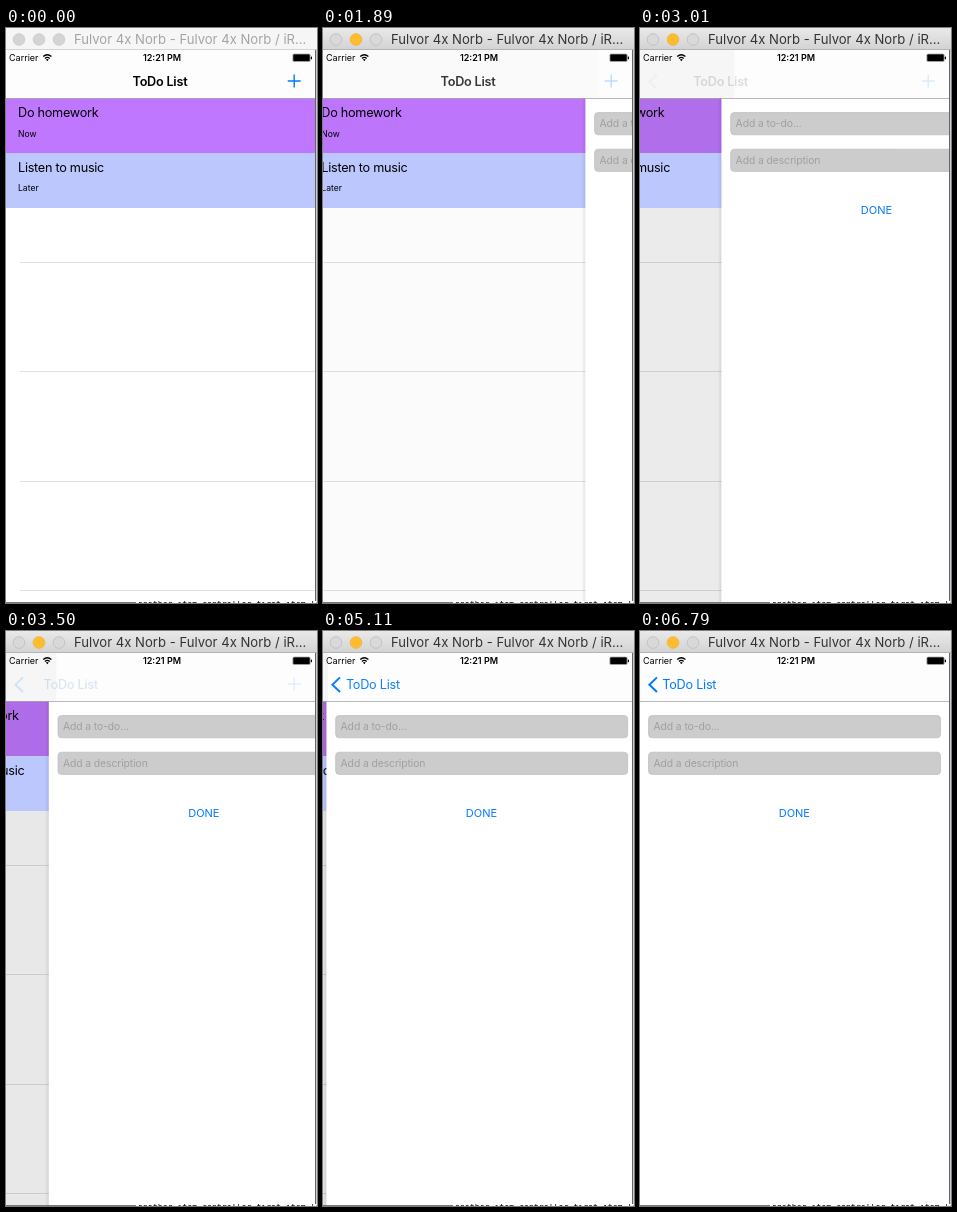
An HTML page for the animation above (8 s loop, 311 by 575 pixels).

```html
<!DOCTYPE html>
<html lang="en">
<head>
<meta charset="utf-8">
<title>To-do push transition</title>
<style>
  html, body { margin: 0; width: 100%; height: 100%; overflow: hidden; background: #fff; }
  svg { display: block; width: 311px; height: 575px; font-family: Inter, Roboto, "Liberation Sans", sans-serif; }
  text { white-space: pre; }
  .body { font-size: 12.7px; letter-spacing: -.022em; }
  .small { font-size: 8.6px; }
  .status { font-size: 9px; }
  .nav { font-size: 12.7px; letter-spacing: -.02em; }
  .hint { font-size: 10.4px; letter-spacing: -.01em; fill: #a0a0a0; }
  .done { font-size: 11px; fill: #007aff; }
  .rule { stroke: #e0e0e2; }
  .field { fill: #ccc; stroke: #bcbcbc; stroke-width: .7; }
  .code { font: 8.2px "DejaVu Sans Mono", monospace; }
</style>
</head>
<body>
<svg viewBox="0 0 311 575">
  <defs>
    <linearGradient id="activeBar" x2="0" y2="1">
      <stop stop-color="#e9e9e9"/><stop offset="1" stop-color="#d3d3d3"/>
    </linearGradient>
    <linearGradient id="shade">
      <stop stop-opacity="0"/><stop offset="1" stop-opacity=".09"/>
    </linearGradient>
    <clipPath id="screen"><rect y="22" width="309.5" height="552"/></clipPath>
    <clipPath id="below"><rect x="130" y="573" width="181" height="2"/></clipPath>
  </defs>

  <rect width="311" height="575" fill="#fff"/>

  <g clip-path="url(#screen)">
    <g id="list">
      <rect y="70.5" width="420" height="54.5" fill="#bf77ff"/>
      <g id="rules"></g>
      <rect id="dim" y="70" width="420" height="504"/>
      <rect y="125" width="309.5" height="55" fill="#bbc7fd"/>
      <text class="body" x="12" y="88.5">Do homework</text>
      <text class="small" x="12" y="108.6">Now</text>
      <text class="body" x="12" y="143.5">Listen to music</text>
      <text class="small" x="12" y="163.4">Later</text>
    </g>

    <g id="form">
      <rect x="-5" y="70" width="4" height="504" fill="url(#shade)"/>
      <rect x="-1" y="70" width="311" height="504" fill="#fff"/>
      <rect class="field" x="8.2" y="84.6" width="292" height="22.2" rx="3.5"/>
      <rect class="field" x="8.2" y="121.2" width="292" height="22.2" rx="3.5"/>
      <text class="hint" x="13.1" y="99.2">Add a to-do...</text>
      <text class="hint" x="13.1" y="135.8">Add a description</text>
      <text class="done" x="154" y="185.9" text-anchor="middle">DONE</text>
    </g>

    <rect y="22" width="310" height="48.5" fill="#fdfdfd"/>
    <rect id="navDim" y="22" height="48"/>
    <path d="M0 70.5H309.5" stroke="#000" stroke-opacity=".28"/>
    <path id="back" d="M17 46.4L9.4 53.7L17 61" fill="none" stroke="#007aff" stroke-width="2"/>
    <text id="title" class="nav" y="58.2" font-weight="600">ToDo List</text>
    <text id="label" class="nav" y="58.2" fill="#007aff">ToDo List</text>
    <path id="plus" d="M281.7 53H294.7M288.2 46.5V59.5" stroke="#007aff" stroke-width="1.4"/>

    <text class="status" x="3" y="33">Carrier</text>
    <path d="M37.2 28.6Q41.3 24.9 45.4 28.6M38.9 30.5Q41.3 28.3 43.7 30.5" fill="none" stroke="#000" stroke-width="1.3"/>
    <path d="M39.9 31.6Q41.3 30.5 42.7 31.6L41.3 33.2Z"/>
    <text class="status" x="156" y="33" text-anchor="middle" font-weight="600">12:21 PM</text>
    <rect x="286.6" y="25.8" width="17.8" height="8" rx="1.5" opacity=".5"/>
    <rect x="287.4" y="26.6" width="16.2" height="6.4" rx=".8"/>
    <rect x="304.8" y="28.6" width="1.2" height="2.6" rx=".5"/>
  </g>

  <rect id="bar" width="311" height="21.5"/>
  <path id="barLine" d="M0 21.5H311"/>
  <g id="lights"></g>
  <text id="caption" x="68" y="16" font-size="13.1">Fulvor 4x Norb - Fulvor 4x Norb / iR...</text>

  <rect x="310" y="22" width="1" height="553" fill="#c8ccd8"/>
  <path d="M309.5 22V574" stroke="#666"/>
  <path d="M0 574.5H310" stroke="#777"/>
  <g clip-path="url(#below)">
    <rect x="130" y="573" width="181" height="2" fill="#fff"/>
    <text class="code" x="132" y="579">another item controller first item list</text>
  </g>
</svg>
<script>
  const LOOP = 8000, PRESS = 1400, MOVE = 1540, STEP = 70, LAST = 6790;
  const WIDTH = 309, SPRING = 0.00172, RELEASE = 1497;
  const NS = "http://www.w3.org/2000/svg";
  const $ = id => document.getElementById(id);
  const set = (el, attrs) => {
    for (const key in attrs) el.setAttribute(key, attrs[key]);
    return el;
  };
  const add = (parent, tag, attrs) =>
    parent.appendChild(set(document.createElementNS(NS, tag), attrs));

  for (const y of [234.5, 343.5, 453.5, 562.5])
    add($("rules"), "path", { class: "rule", d: `M14 ${y}H420` });
  const lights = [13, 33, 53].map(cx =>
    add($("lights"), "circle", { cx, cy: 11.5, r: 5.8, "stroke-width": 0.8 }));

  // Share of the push still to go: a critically damped spring, sampled in steps.
  function remaining(t) {
    if (t < MOVE) return 1;
    const at = MOVE + Math.floor((Math.min(t, LAST) - MOVE) / STEP) * STEP;
    const s = SPRING * (at - RELEASE);
    return (1 + s) * Math.exp(-s);
  }

  function drawWindow(active) {
    set($("bar"), { fill: active ? "url(#activeBar)" : "#f6f6f6" });
    set($("barLine"), { stroke: active ? "#b4b4b4" : "#d4d4d4" });
    set($("caption"), { fill: active ? "#333" : "#a4a4a4" });
    lights.forEach((light, i) => {
      const lit = active && i === 1;
      set(light, {
        fill: lit ? "#ffbd2e" : active ? "#d9d9d9" : "#d4d4d4",
        stroke: lit ? "#efb035" : active ? "#bcbcbc" : "#c8c8c8"
      });
    });
  }

  function draw(t) {
    const pressed = t >= PRESS;
    const q = remaining(t), p = 1 - q;
    const edge = q * WIDTH;
    drawWindow(pressed);

    set($("list"), { transform: `translate(${-0.3 * WIDTH * p} 0)` });
    set($("dim"), { opacity: 0.105 * p });
    set($("form"), { transform: `translate(${edge} 0)`, visibility: q < 1 ? "visible" : "hidden" });
    set($("navDim"), { width: Math.min(WIDTH, edge + 12 * Math.min(1, edge / 80)), opacity: 0.03 * Math.sqrt(p) });

    // The title lags the page a little, then settles as the back label.
    const lag = q + 0.58 * q * q * p - 0.8 * q * p ** 20;
    const x = 22.3 + 104.2 * lag;
    const blue = Math.min(1, 1.2 * p ** 16);
    set($("title"), { x, opacity: q ** 1.6 });
    set($("label"), { x, opacity: blue });
    set($("back"), { opacity: Math.min(1, 0.06 * p + 0.95 * blue) });
    set($("plus"), { opacity: pressed ? (0.08 + 0.2 * q) * Math.min(1, Math.max(0, (q - 0.02) / 0.04)) : 1 });
  }

  const start = performance.now();
  function tick() {
    draw((performance.now() - start) % LOOP);
    requestAnimationFrame(tick);
  }
  draw(0);
  requestAnimationFrame(tick);
</script>
</body>
</html>
```
